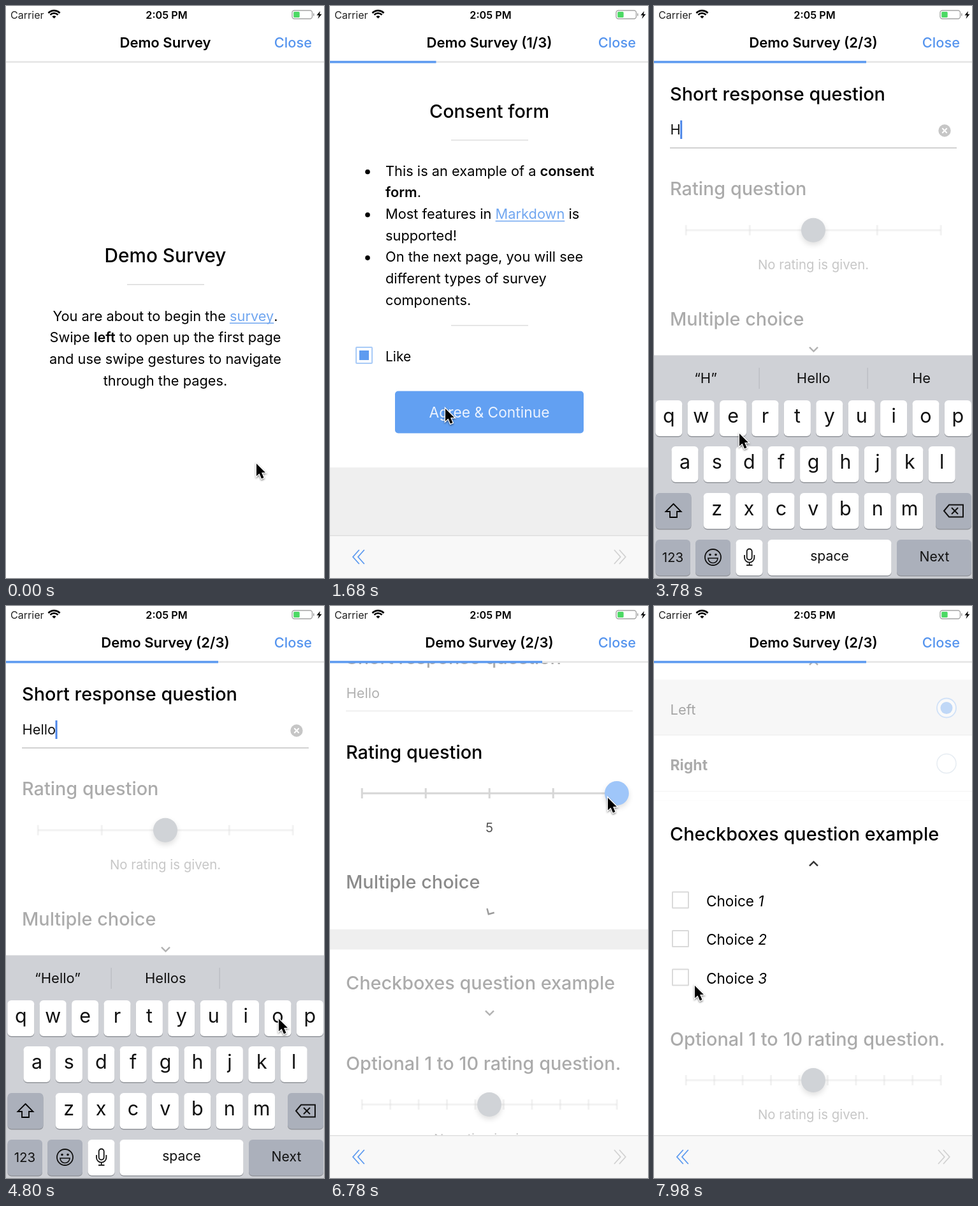
Animation, 499 px wide and 895 px high, one loop 8 s. Source, as an HTML page with a canvas:

```html
<!DOCTYPE html>
<html lang="en">
<head>
<meta charset="utf-8">
<title>Demo Survey</title>
<style>
  html, body { margin: 0; width: 100%; height: 100%; overflow: hidden; background: #fff; }
  canvas { display: block; width: 499px; height: 895px; }
</style>
</head>
<body>
<canvas id="stage"></canvas>
<script>
const W = 499, H = 895, LOOP = 8000;
const BLUE = '#5e9bf0', GREY = '#efefef', FAINT = 0.33;
const BODY = 21.8, HEADING = 28.85;
const canvas = document.getElementById('stage');
const scale = window.devicePixelRatio || 1;
canvas.width = W * scale;
canvas.height = H * scale;
const ctx = canvas.getContext('2d');

// Timing helpers
const clamp = v => Math.max(0, Math.min(1, v));
const ease = (t, from, to) => { const k = clamp((t - from) / (to - from)); return k * k * (3 - 2 * k); };
const mix = (a, b, k) => a + (b - a) * k;

// Drawing helpers
function rect(x, y, w, h, color) { ctx.fillStyle = color; ctx.fillRect(x, y, w, h); }

function rounded(x, y, w, h, r, fill, stroke, width = 2) {
  ctx.beginPath();
  ctx.roundRect(x, y, w, h, r);
  paint(fill, stroke, width);
}

function circle(x, y, r, fill, stroke, width = 2) {
  ctx.beginPath();
  ctx.arc(x, y, r, 0, 7);
  paint(fill, stroke, width);
}

function poly(points, fill, stroke, width = 2, close = true) {
  ctx.beginPath();
  points.forEach(([x, y]) => ctx.lineTo(x, y));
  if (close) ctx.closePath();
  paint(fill, stroke, width);
}

function paint(fill, stroke, width) {
  if (fill) { ctx.fillStyle = fill; ctx.fill(); }
  if (stroke) { ctx.strokeStyle = stroke; ctx.lineWidth = width; ctx.stroke(); }
}

function setFont(style, size) { ctx.font = `${style} ${size}px Inter, "Open Sans", sans-serif`; }

// y is the middle of the capitals
function text(s, x, y, size = BODY, { style = 400, color = '#000', align = 'left' } = {}) {
  setFont(style, size);
  ctx.fillStyle = color;
  ctx.textAlign = align;
  ctx.fillText(s, x, y + size * 0.36);
}

// Mixed styles on one line: *bold*, _italic_, [link]
function rich(line, x, y, size = BODY, centered = false) {
  const runs = line.split(/(\*.+?\*|_.+?_|\[.+?\])/).filter(Boolean).map(part => {
    const style = { '*': 600, '_': 'italic 400' }[part[0]] || 400;
    const link = part[0] === '[';
    const s = /^[*_[]/.test(part) ? part.slice(1, -1) : part;
    setFont(style, size);
    return { s, style, link, width: ctx.measureText(s).width };
  });
  if (centered) x -= runs.reduce((sum, run) => sum + run.width, 0) / 2;
  for (const { s, style, link, width } of runs) {
    text(s, x, y, size, { style, color: link ? '#70a6f0' : '#000' });
    if (link) rect(x, y + 10.5, width, 1.5, '#70a6f0');
    x += width;
  }
}

function faded(alpha, draw) {
  ctx.save();
  ctx.globalAlpha *= alpha;
  draw();
  ctx.restore();
}

function moved(x, y, draw) {
  ctx.save();
  ctx.translate(x, y);
  draw();
  ctx.restore();
}

// Chrome
function statusBar() {
  text('Carrier', 7, 14, 16.1, { color: '#222' });
  text('2:05 PM', 252, 14, 16.2, { style: 600, align: 'center' });
  for (const r of [4.2, 8.3, 12.4]) {
    ctx.beginPath();
    ctx.arc(75.5, 19.5, r, -Math.PI * 0.76, -Math.PI * 0.24);
    if (r < 5) { ctx.lineTo(75.5, 19.5); paint('#000'); } else paint(null, '#000', 2.6);
  }
  rounded(449, 7, 31.5, 13, 3.5, null, '#a5a5a5', 1.4);
  rounded(451.2, 9, 9.5, 9, 1.5, '#4cd964');
  rect(482, 11.5, 1.6, 4, '#a5a5a5');
  poly([[493, 8], [487.5, 14.5], [491, 14.5], [489.5, 20], [495.5, 12.8], [492, 12.8]], '#000');
}

function header(t) {
  rect(0, 0, W, 89, '#fff');
  statusBar();
  const step = t < 420 ? '' : t < 1880 ? ' (1/3)' : ' (2/3)';
  text('Demo Survey' + step, 250, 57, 22.1, { style: 600, align: 'center' });
  text('Close', 480, 57, 21.8, { style: 500, color: '#5594ee', align: 'right' });
  rect(0, 86, W, 3, '#e8e8e8');
  rect(0, 85.8, 166.5 * (ease(t, 420, 780) + ease(t, 1860, 2200)), 3.6, BLUE);
}

function navBar(t) {
  moved(0, 67 * (1 - ease(t, 420, 760)), () => {
    rect(0, 828, W, 67, '#f8f8f8');
    rect(0, 828, W, 1.3, '#dcdcdc');
    for (const dx of [0, 8]) {
      poly([[45.8 + dx, 851], [36 + dx, 862], [45.8 + dx, 873]], null, BLUE, 1.8, false);
      poly([[446 + dx, 851], [455.8 + dx, 862], [446 + dx, 873]], null, '#d2d2d2', 1.8, false);
    }
  });
}

// Pages
function introPage() {
  rect(0, 0, W, H, '#fff');
  text('Demo Survey', 250, 390, 29.75, { style: 500, align: 'center' });
  rect(190, 435, 121, 1.6, '#dcdcdc');
  ['You are about to begin the [survey].', 'Swipe *left* to open up the first page',
    'and use swipe gestures to navigate', 'through the pages.']
    .forEach((line, i) => rich(line, 250, 485 + i * 33.6, BODY, true));
}

function consentPage(t) {
  rect(0, 0, W, H, GREY);
  rect(0, 0, W, 722, '#fff');
  text('Consent form', 250, 165, HEADING, { style: 500, align: 'center' });
  for (const y of [209, 499]) rect(190, y, 121, 1.6, '#e0e0e0');
  ['This is an example of a *consent*', '*form*.', 'Most features in [Markdown] is', 'supported!',
    'On the next page, you will see', 'different types of survey', 'components.']
    .forEach((line, i) => {
      const y = 258 + i * 33.65;
      rich(line, 87, y);
      if (i % 2 === 0 && i < 6) circle(59, y + 1.5, 3.8, '#000');
    });
  const checked = t > 1200;
  rounded(41, 534, 25, 25, 1, '#fff', checked ? '#a9cbf7' : '#d8d8d8', 2);
  if (checked) rect(46, 539, 15, 15, BLUE);
  text('Like', 87, 548, 21);
  rounded(102, 602.5, 296, 66, 5, '#62a0f2');
  text('Agree & Continue', 250, 636, 22.8, { color: '#ecf3fe', align: 'center' });
}

function question(title, y, focus) {
  faded(focus, () => text(title, 25, y, HEADING, { style: 500 }));
}

function slider(y, steps, focus, x, thumb, label) {
  faded(focus, () => {
    rect(50, y - 1.5, 400, 3, '#d6d6d6');
    for (let i = 0; i < steps; i++) rect(48.7 + 400 * i / (steps - 1), y - 8, 3, 16, '#d6d6d6');
    text(label, 250, y + 53.5, 20.4, { color: '#555', align: 'center' });
  });
  ctx.save();
  ctx.shadowColor = 'rgba(0,0,0,.13)';
  ctx.shadowBlur = 8 * scale;
  ctx.shadowOffsetY = 4 * scale;
  circle(x, y, 19, thumb);
  ctx.restore();
}

function chevron(y, open, focus) {
  moved(250.5, y, () => {
    ctx.rotate(Math.PI * open);
    faded(mix(0.3, 0.8, (focus - FAINT) / (1 - FAINT)),
      () => poly([[-6.5, -3.2], [0, 3.3], [6.5, -3.2]], null, '#000', 2.5, false));
  });
}

// Unfolds a block of the given height below y, its contents fading in late
function unfold(y, height, open, draw) {
  if (!open) return;
  ctx.save();
  ctx.beginPath();
  ctx.rect(0, y, W, height * open);
  ctx.clip();
  rect(0, y, W, height, GREY);
  ctx.globalAlpha = clamp((open - 0.3) / 0.5);
  rect(0, y, W, height, '#fff');
  draw();
  ctx.restore();
}

function radioRows(y, focus, selected) {
  faded(focus, () => {
    if (selected) rect(0, y, W, 88, '#e6e6e6');
    for (const i of [1, 2]) rect(0, y + 88 * i - 1, W, 1, '#d4d4d4');
    text('Left', 25.5, y + 47.5, 22);
    text('Right', 25.5, y + 134.5, 23, { style: 700 });
    circle(459, y + 45, 15, '#fff', selected ? '#80b3f5' : '#b9cbe0', 1.8);
    if (selected) circle(459, y + 45, 9.5, '#4b92ee');
    circle(459, y + 132, 15, '#fff', '#b4c6d8', 1.5);
  });
}

function checkRows(y) {
  [1, 2, 3].forEach(n => {
    const middle = y + 58 + (n - 1) * 60.5;
    rounded(29, middle - 14, 25, 25, 0.5, '#fff', '#dadada', 2);
    rich(`Choice _${n}_`, 82, middle, 22.6);
  });
}

const keyTimes = [3240, 3840, 4300, 4460, 4740];
const typedCount = t => keyTimes.filter(k => t >= k).length;

function surveyPage(t) {
  const radioOpen = ease(t, 6692, 7034), checkOpen = ease(t, 7300, 7660);
  const scroll = 26 * ease(t, 5200, 5400) + 189 * radioOpen + 233 * checkOpen;
  const focusBetween = (on, off) => mix(FAINT, 1, ease(t, on, on + 220) - ease(t, off, off + 220));
  const short = mix(1, FAINT, ease(t, 5200, 5460));
  const rating = focusBetween(5200, 6790);
  const radio = focusBetween(6720, 7320);
  const check = focusBetween(7320, 9000);

  rect(0, 0, W, H, '#fff');
  moved(0, -scroll, () => {
    const typed = 'Hello'.slice(0, typedCount(t));
    question('Short response question', 138, short);
    faded(short, () => {
      text(typed || 'Optional', 25.5, 193.5, BODY, { color: typed ? '#111' : '#c7c7cb' });
      const end = typed ? ctx.measureText(typed).width : 0;
      rect(25, 221.3, 450, 1.5, '#c4c4c4');
      if (t > 5200) return;
      if (t > 2160) rect(25 + end, 179, 3, 29, '#4d86e8');
      if (typed) {
        circle(456, 195, 9.7, '#c6c6c6');
        poly([[452.3, 191.3], [459.7, 198.7]], null, '#fff', 2, false);
        poly([[459.7, 191.3], [452.3, 198.7]], null, '#fff', 2, false);
      }
    });

    const slide = 200 * ease(t, 6120, 6420);
    const active = (rating - FAINT) / (1 - FAINT);
    const grey = [mix(208, 158, active), mix(211, 158, active), mix(215, 158, active)];
    question('Rating question', 286, rating);
    slider(350.8, 5, rating, 250 + slide, slide ? '#9fc6f9' : `rgb(${grey})`,
      slide ? String(Math.round(3 + slide / 100)) : 'No rating is given.');

    question('Multiple choice', 489.5, radio);
    chevron(537, radioOpen, radio);
    unfold(563.5, 189, radioOpen, () => radioRows(562.5, radio, t > 7180));

    moved(0, 189 * radioOpen, () => {
      question('Checkboxes question example', 615.5, check);
      chevron(662.5, checkOpen, check);
      unfold(686, 195, checkOpen, () => checkRows(662.5));
    });
    moved(0, 189 * radioOpen + 195 * checkOpen, () => {
      question('Optional 1 to 10 rating question.', 742, FAINT);
      slider(806, 10, FAINT, 250, '#d0d3d7', 'No rating is given.');
    });
  });
  faded(ease(t, 2200, 2300) * (1 - ease(t, 2580, 2800)),
    () => rounded(494.5, 90, 3.5, 328, 2, '#b4b4b4'));
}

// Keyboard
const suggestions = [
  ['I', 'The', 'Hello'], ['“H”', 'Hello', 'He'], ['“He”', 'Hello', 'Help'],
  ['“Hel”', 'Hello', 'Help'], ['“Hell”', 'Hello', 'Hells'], ['“Hello”', 'Hellos', '']];
const rows = [['qwertyuiop', 23.3, 617], ['asdfghjkl', 48.5, 689], ['zxcvbnm', 98.7, 762]];

function key(x, y, w, special) {
  rounded(x, y + 1.6, w, 56, 6, '#93969c');
  rounded(x, y, w, 56, 6, special ? '#abb0bb' : '#fff');
}

function keyboard(t) {
  const hidden = 1 - ease(t, 2160, 2460) + ease(t, 5200, 5500);
  if (hidden >= 1) return;
  const leaving = t > 5200, count = typedCount(t), caps = count === 0;
  const label = { align: 'center', color: '#111' };
  moved(0, 348 * hidden, () => {
    const top = leaving ? 598 : 546.5;
    rect(0, top, W, H - top, '#cfd1d6');
    if (!leaving) {
      suggestions[count].forEach((word, i) => text(word, 81 + i * 169.3, 582, 22, label));
      for (const x of [164.5, 334.5]) rect(x, 566, 1.3, 33, '#babcc1');
    }
    for (const [letters, x0, y] of rows) {
      [...letters].forEach((letter, i) => {
        const x = x0 + i * 50.4;
        key(x - 21, y, 42, false);
        if (caps) text(letter.toUpperCase(), x, y + 28.5, 28.5, label);
        else text(letter, x, y + 24, 30.5, label);
      });
    }
    key(2.5, 762, 56, !caps);
    poly([[30.5, 779], [42.5, 791], [36, 791], [36, 800], [25, 800], [25, 791], [18.5, 791]],
      caps ? '#000' : null, '#000', 1.8);
    key(442, 762, 56, true);
    poly([[455, 790], [463, 780.5], [485, 780.5], [485, 799.5], [463, 799.5]], null, '#111', 2);
    poly([[467, 785], [477, 795]], null, '#111', 2, false);
    poly([[477, 785], [467, 795]], null, '#111', 2, false);

    key(2.5, 835, 54.5, true);
    text('123', 29.5, 863, 20.5, label);
    key(65, 835, 55, true);
    circle(92.5, 862.5, 12.5, null, '#111', 1.8);
    for (const x of [88, 97]) circle(x, 858.5, 1.8, '#111');
    ctx.beginPath();
    ctx.arc(92.5, 864, 7.5, 0, Math.PI);
    ctx.closePath();
    paint(null, '#111', 1.7);
    key(128.5, 835, 42, false);
    rounded(145.7, 849.5, 8, 17, 4, null, '#111', 1.8);
    ctx.beginPath();
    ctx.moveTo(142, 859);
    ctx.arc(149.7, 863, 7.7, Math.PI, 0, true);
    ctx.lineTo(157.4, 859);
    paint(null, '#111', 1.8);
    rect(148.8, 870, 1.8, 5, '#111');
    rect(145, 874, 9.5, 1.8, '#111');
    key(178.5, 835, 194, false);
    text('space', 275.5, 860.5, 21.2, label);
    key(381, 835, 117, true);
    text('Next', 440, 861.5, 21.2, label);
  });
}

// Pointer path: time, x, y
const path = [
  [0, 393, 715], [120, 393, 715], [500, 110, 690], [840, 90, 650], [1140, 54, 548], [1300, 54, 548],
  [1620, 181, 629], [1860, 181, 629], [2440, 135, 587], [2640, 135, 587], [3160, 302, 715],
  [3300, 302, 715], [3720, 134, 668], [3900, 134, 668], [4240, 452, 715], [4500, 452, 715],
  [4700, 428, 645], [4800, 428, 645], [5140, 445, 863], [5460, 445, 863], [6060, 250, 326],
  [6120, 250, 326], [6420, 446, 322], [6600, 446, 322], [6770, 436, 299], [6810, 436, 299],
  [7120, 200, 420], [7240, 200, 420], [7920, 64, 593], [8000, 64, 593]];

function pointer(t) {
  const i = path.findIndex(p => p[0] > t);
  const [t0, x0, y0] = path[i - 1], [t1, x1, y1] = path[i];
  const k = ease(t, t0, t1);
  moved(mix(x0, x1, k), mix(y0, y1, k) + 1, () => {
    const arrow = [[0, 0], [0, 19.5], [4.6, 15.4], [8, 23.5], [11.5, 22], [8.1, 14], [14, 14]];
    ctx.shadowColor = 'rgba(0,0,0,.4)';
    ctx.shadowBlur = 3 * scale;
    ctx.shadowOffsetY = 1.5 * scale;
    poly(arrow, '#fff', '#fff', 2.6);
    ctx.shadowColor = 'transparent';
    poly(arrow, '#000');
  });
}

function draw(t) {
  ctx.setTransform(scale, 0, 0, scale, 0, 0);
  rect(0, 0, W, H, '#fff');
  const position = ease(t, 60, 740) + ease(t, 1800, 2140);
  [introPage, consentPage, surveyPage].forEach((page, i) => {
    if (Math.abs(i - position) < 1) moved((i - position) * W, 0, () => page(t));
  });
  navBar(t);
  header(t);
  keyboard(t);
  pointer(t);
}

const start = performance.now();
function frame() {
  draw((performance.now() - start) % LOOP);
  requestAnimationFrame(frame);
}
frame();
</script>
</body>
</html>
```
